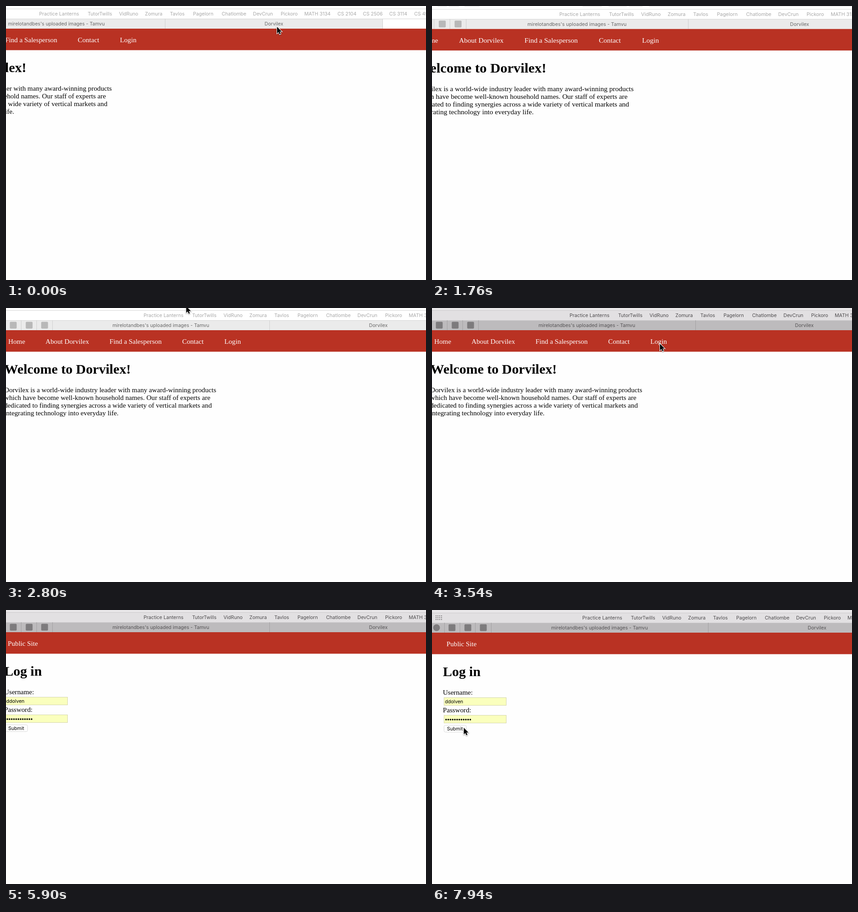
Recreate the animation shown at these times as an HTML page. Size 925 px wide and 605 px high, loop 8000 ms.

```html
<!DOCTYPE html>
<html lang="en">
<head>
<meta charset="utf-8">
<title>Login walkthrough</title>
<style>
html, body { margin: 0; width: 100%; height: 100%; overflow: hidden; background: #fefefe; }
svg {
  display: block;
  --top: #fff; --bar: #fff; --rule: #d6d6d6; --tabs: #ebebeb; --front: #fff;
  --divider: #d0d0d0; --link: #a8a8a8; --label: #666; --icon: #b8b8b8;
}
svg.active {
  --top: #e9e7e9; --bar: #e2e0e2; --rule: #cbc9cb; --tabs: #bdbbbd; --front: #d8d6d8;
  --divider: #a3a1a3; --link: #4c4a4c; --label: #555355; --icon: #7d7b7d;
}
text { white-space: pre; }
.sans { font: 10.6px Inter, sans-serif; }
.serif { font: 15.2px "Liberation Serif", serif; }
.heading { font: bold 30.2px "Liberation Serif", serif; }
.middle { text-anchor: middle; }
</style>
</head>
<body>
<svg id="stage" width="925" height="605" viewBox="0 0 925 605">
  <defs>
    <linearGradient id="sky" x2="0" y2="1">
      <stop offset="0" stop-color="#6c9fce"/>
      <stop offset=".5" stop-color="#b5c5d4"/>
      <stop offset=".53" stop-color="#8b909d"/>
      <stop offset=".75" stop-color="#7b7f8d"/>
      <stop offset=".98" stop-color="#3d404f"/>
      <stop offset=".99" stop-color="#ad7a40"/>
    </linearGradient>
  </defs>
  <rect width="925" height="605" fill="url(#sky)"/>
  <g id="browser">
    <g id="chrome"></g>
    <path id="close" d="M1095 35l8 8m0-8l-8 8" stroke="#6a686a"/>
    <g id="home"></g>
    <g id="login"></g>
  </g>
  <path id="pointer" d="M0 0V14.5L3.3 11.4L5.6 16.6L8 15.6L5.8 10.5H10.3Z" stroke="#fff" stroke-width="2"
    paint-order="stroke" style="filter: drop-shadow(0 1px 1px rgba(0,0,0,.4))"/>
</svg>
<script>
const $ = id => document.getElementById(id);
const LOOP = 8000, TICK = 147;

const BOOKMARKS = [['Practice Lanterns', 331], ['TutorTwills', 438], ['VidRuno', 507], ['Zomura', 564],
  ['Tavlos', 619], ['Pagelorn', 670], ['Chatlombe', 733], ['DevCrun', 802], ['Pickoro', 863],
  ['MATH 3134', 915], ['CS 2104', 988], ['CS 2506', 1044], ['CS 3114', 1102], ['CS 4984', 1157]];
const NAV = [['Home', 33], ['About Dorvilex', 115], ['Find a Salesperson', 256], ['Contact', 416], ['Login', 509]];
const INTRO = ['Dorvilex is a world-wide industry leader with many award-winning products',
  'which have become well-known household names. Our staff of experts are',
  'dedicated to finding synergies across a wide variety of vertical markets and',
  'integrating technology into everyday life.'];

// Keys: tick, then values
const VIEW = [[0, -258, 0, 1], [8, -258, 0, 1], [14, 11.7, 1, 1.0315], [17, -28, -1, 1],
  [41, -28, -1, 1], [45, 0, 0, 1]];
const POINTER = [[0, 597, 46], [7, 885, 40], [8, 893, 32], [10, 900, -22], [18, 380, -22], [22, 488, 94],
  [24, 502, 79], [26, 502, 79], [29, 342, 200], [30, 342, 200], [33, 51, 263], [35, 51, 263],
  [38, 181, -6], [40, 181, -22], [45, 175, -20], [46, 175, -15], [47, 175, -15], [53, 74, 256], [54, 70, 260]];

function sample(keys, tick) {
  const next = keys.findIndex(key => key[0] > tick);
  if (next < 0) return keys[keys.length - 1].slice(1);
  const a = keys[next - 1], b = keys[next];
  const u = (tick - a[0]) / (b[0] - a[0]), eased = u * u * (3 - 2 * u);
  return a.slice(1).map((v, i) => v + (b[i + 1] - v) * eased);
}

const rect = (x, y, w, h, fill, extra = '') =>
  `<rect x="${x}" y="${y}" width="${w}" height="${h}" style="fill:${fill}" ${extra}/>`;
const strip = (y, h, fill) => rect(-5.5, y, 1600, h, fill);
const dot = (x, y, r, fill) => `<circle cx="${x}" cy="${y}" r="${r}" style="fill:${fill}"/>`;
const text = (str, x, y, type, fill = '#000') =>
  `<text x="${x}" y="${y}" class="${type}" style="fill:${fill}">${str}</text>`;
const each = (list, fn) => list.map(fn).join('');
const range = n => [...Array(n).keys()];

$('chrome').innerHTML =
  strip(-5, 620, '#fefefe') + strip(-5, 11, 'var(--top)') +
  each([[69, 20], [93, 22], [127, 32], [381, 41], [437, 39], [481, 29], [524, 1000]],
    ([x, w]) => rect(x, -1, w, 1, '#d6d6d6')) +
  strip(6, 22, 'var(--bar)') + strip(6, 1, 'var(--rule)') +
  each(range(12), i => rect(8 + i % 4 * 4, 12 + (i >> 2) * 4, 2, 2, 'var(--icon)')) +
  each(BOOKMARKS, ([name, x]) => text(name, x, 21, 'sans', 'var(--link)')) +
  strip(28, 22, 'var(--tabs)') + rect(1087, 28, 500, 22, 'var(--front)') + strip(28, 1, 'var(--rule)') +
  each([27, 61, 95, 130, 608, 1087], x => rect(x, 28, 1, 22, 'var(--divider)')) +
  dot(10, 39, 7.5, 'var(--icon)') +
  each([44, 79, 113], x => rect(x - 7.5, 31.5, 15, 15, 'var(--icon)', 'rx="2"')) +
  text("mirelotandbes's uploaded images - Tamvu", 369, 43, 'sans middle', 'var(--label)') +
  text('Dorvilex', 848, 43, 'sans middle', 'var(--label)') +
  strip(50, 47.5, '#b93223');

$('home').innerHTML =
  each(NAV, ([name, x]) => text(name, x, 80, 'serif', '#fff')) +
  text('Welcome to Dorvilex!', 24.5, 146, 'heading') +
  each(INTRO, (line, i) => text(line, 24, 187 + i * 17, 'serif'));

$('login').innerHTML =
  text('Public Site', 32, 80, 'serif', '#fff') +
  text('Log in', 24, 146, 'heading') +
  text('Username:', 24, 187, 'serif') +
  text('Password:', 24, 226, 'serif') +
  each([193.5, 232.5], y => rect(26.5, y, 137, 17, '#faffbd', 'stroke="#d5d6ac"')) +
  text('ddolven', 28.5, 206, 'sans') +
  each(range(12), i => dot(31 + i * 4.85, 242, 1.8, '#000')) +
  rect(26.5, 254.5, 49, 15, '#fff', 'rx="3" stroke="#d8d8d8"') +
  text('Submit', 50.5, 266, 'sans middle');

const show = (id, on) => $(id).setAttribute('visibility', on ? 'visible' : 'hidden');

function draw(now) {
  const tick = Math.floor((now % LOOP + 10) / TICK);
  const active = (tick >= 4 && tick < 9) || (tick >= 21 && tick < 43) || tick >= 50;
  const [dx, dy, scale] = sample(VIEW, tick);
  const [px, py] = sample(POINTER, tick);
  $('stage').classList.toggle('active', active);
  $('browser').setAttribute('transform', `matrix(${scale} 0 0 1 ${dx} ${dy})`);
  $('pointer').setAttribute('transform', `translate(${px} ${py})`);
  show('close', active && tick < 9 && px > 829);
  show('home', tick < 27);
  show('login', tick >= 27);
  requestAnimationFrame(draw);
}
requestAnimationFrame(draw);
</script>
</body>
</html>
```
